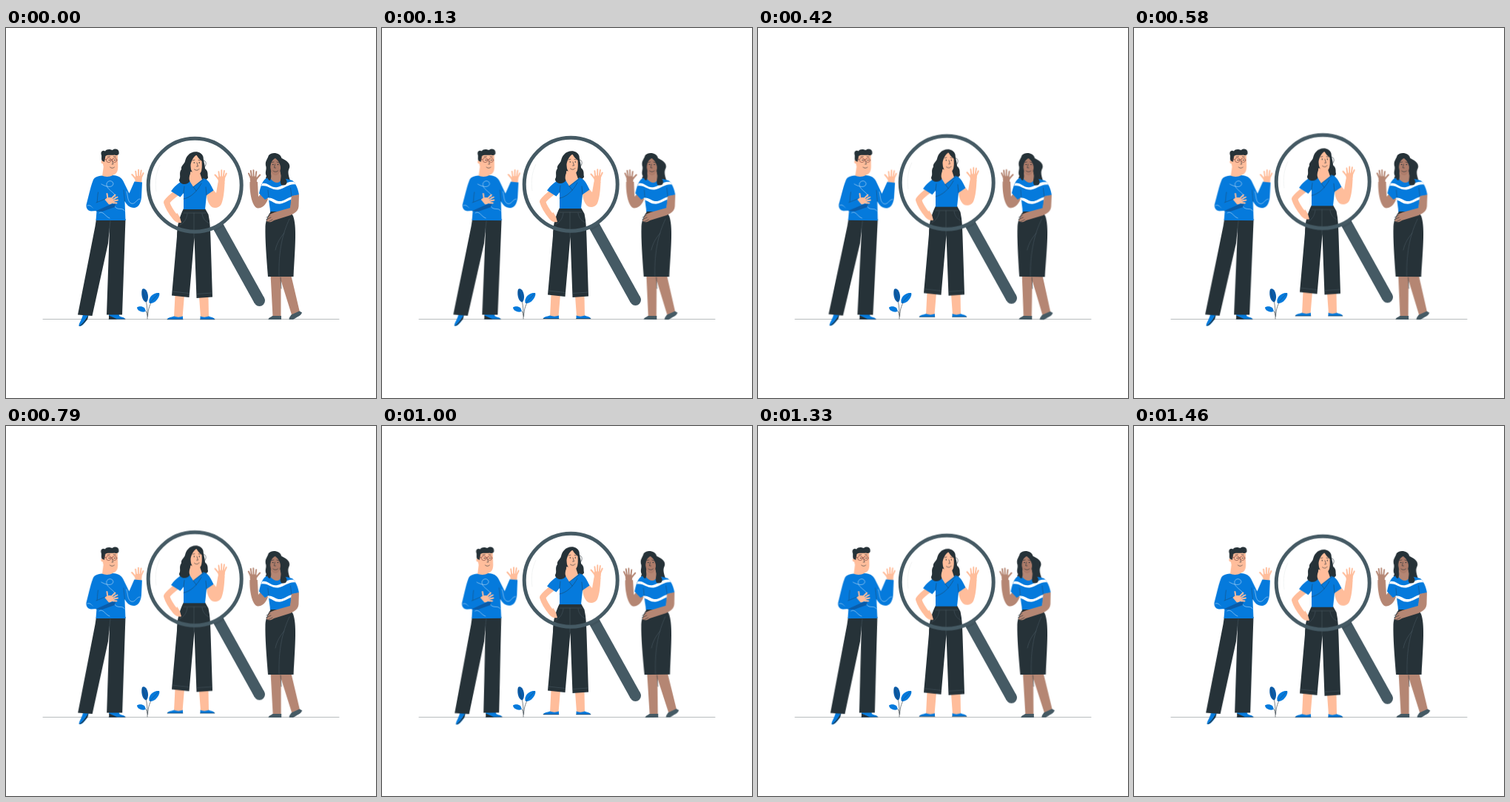
Recreate the animation shown at these times as an HTML page. Size 500 by 500 pixels, loop 1.5 s.

```html
<!DOCTYPE html>
<html lang="en">
<head>
<meta charset="utf-8">
<title>Team under the magnifier</title>
<style>
  html, body { margin: 0; width: 100%; height: 100%; overflow: hidden; background: #fff; }
  svg { display: block; width: 100%; height: 100%; }
  .blue { fill: #057adc; }
  .navy { fill: #0a5ba8; }
  .dark { fill: #263238; }
  .slate { fill: #455a64; }
  .light { fill: #ffbd9b; color: #ffbd9b; }
  .brown { fill: #b58673; color: #b58673; }
  .line { fill: none; stroke: #263238; stroke-width: .6; stroke-linecap: round; stroke-linejoin: round; }
  .pale { stroke: #fff; opacity: .75; }
  .seam { stroke: #4c5d66; stroke-width: .5; }
  .limb { fill: none; stroke: currentColor; stroke-linecap: round; stroke-linejoin: round; }
  .sway { animation: sway 1.5s linear infinite; }
  .man { transform-origin: 141.5px 283px; }
  .guest { transform-origin: 363px 282px; }
  .rise { animation: rise 1.5s linear infinite; }
  @keyframes sway {
    25% { transform: rotate(1deg); }
    75% { transform: rotate(-1deg); }
  }
  @keyframes rise {
    50% { transform: translateY(-6px); }
  }
</style>
</head>
<body>
<svg viewBox="0 0 500 500">
  <defs>
    <!-- raised hand, wrist at the origin -->
    <g id="palm">
      <path d="M-4 1C-4.500-3-4.500-6-3.800-8.500L4.500-8.500C5.500-5 4.500-2 4.300 1Z"/>
      <path class="limb" stroke-width="1.900" d="M-2.700-8L-3.600-14.800M.1-8L.3-16.800M2.700-8L3.900-16M3.800-6L6.800-12.500"/>
      <path class="limb" stroke-width="2.100" d="M-2.500-3C-4-5-6-8-8.500-10.500"/>
    </g>
  </defs>

  <path class="line" d="M50 393.500H450" stroke-opacity=".55"/>

  <g>
    <path class="line" d="M191 393C191 382 191 374 188 365M191.500 390C192 379 194 373 201 364M191 388C191 384 188 380 182 379.500"/>
    <path class="navy" d="M189 370.500C184 369 182 359 184 353C188 350 192 357 192 363C192 367 191 370 189 370.500Z"/>
    <g class="blue">
      <path d="M194 372C191 365 199 357 207 358C209 361 203 373 194 372Z"/>
      <path d="M188.500 383C184 385 177 382 177 377.500C181 375 189 376 188.500 383Z"/>
    </g>
    <path class="line" d="M184.500 355L189 369M206 359L194.500 371.500" stroke-opacity=".6"/>
  </g>

  <g class="sway man">
    <path class="blue" d="M104 387L111.500 388C111 393 107 398 104 401C102 403 98 404 98.500 402C98.500 399 103 393 104 387Z"/>
    <path class="dark" d="M98.500 402.500C103 401 106 396 111.300 388L110 394C106.500 396 104 403 98.500 402.500Z"/>
    <path class="blue" d="M139 386H152.500L153 389C156 391 161 391 161 393.500H139Z"/>
    <path class="dark" d="M139 388.500C143 390 147 392 150 393.500H139Z"/>
    <path class="line" d="M139 393.300H161"/>
    <path class="dark" d="M122 258H161.500L157 387.500H136L140 270L138 291L116.500 389L97 387.500L120.500 268Z"/>
    <path class="line seam" d="M141 261C140.500 265 140 268 139.500 276"/>

    <path class="light" d="M132 186L144 191L145 200C140 203.500 133 203 130 200.500Z"/>
    <g class="light" transform="translate(178.800 208.500)"><use href="#palm"/></g>
    <path class="blue" d="M129.500 199.500C134 201.500 140 201.500 144.500 199C152 199.500 156 202 158.500 207L166.500 223.500L173.500 207.500L184 208.500L183 229C182 238 178 243 173 243C167 243 163 239 160.500 234L161.500 260H121.500L122.500 247L115 247.500C109 247 107.500 241 109 237C112 225 115 212 118 205C120 201 125 200 129.500 199.500Z"/>
    <g class="line pale">
      <path d="M129 211C134 214 143 217 145 211C145 206 138 205 136 210C135 216 141 219 146 224C151 229 143 234 147 241C150 247 158 242 160 247"/>
      <path d="M110 240C115 238 116 244 121 244M163 221C165 228 164 234 169 237C175 239 176 231 181 231M126 250C131 246 134 255 140 257"/>
    </g>
    <path class="line" d="M122 242C124 235 123 231 124.500 222M160.500 234L159 219" stroke-opacity=".6"/>
    <path class="navy" d="M121 247.500L140 239L148 237L147 242L130 248Z"/>
    <path class="blue" d="M114 239L134 231L140 238.500L121 247Z"/>
    <path class="line" d="M122 236L134 231" stroke-opacity=".6"/>
    <g class="light">
      <path d="M133.500 232C136 229 141 228 144 230.500L146 234.500C143 237.500 141 238.500 139 238.500Z"/>
      <path class="limb" stroke-width="1.900" d="M137.500 230.500L136.500 224M142.500 230.500L147.500 225.500M144 232L150.500 228.500M144.500 234L151 232.500M143 236L149.500 236.500"/>
    </g>

    <path class="light" d="M130.500 171C137 168 147 168 151 171L151.300 187C151.500 195 148 199.500 142 198C135 196 132 190 131 184Z"/>
    <circle class="light" cx="131" cy="181" r="2.500"/>
    <path class="dark" d="M131 180C128 179 129.500 175 129 172C127 167 131 164.500 134 166.500C136 162.500 142 164 144 165C147 162 153 164 152.500 168C153.500 171 150 173 147 171.500C142 172.500 137 170.500 134.500 173L133 181Z"/>
    <g class="line">
      <g stroke="#6b3432"><circle cx="138.800" cy="178.500" r="3.200"/><circle cx="146.800" cy="178.500" r="3"/><path d="M142 178H143.800M135.600 178L132 177"/></g>
      <path d="M137 174L140.500 173.500M145.500 173.500L148.500 174M143.500 180L145 184H143M140.500 188C142.500 190 145 189.500 146.500 188"/>
    </g>
    <g class="dark"><circle cx="139.500" cy="178.500" r=".8"/><circle cx="147" cy="178.500" r=".8"/></g>
  </g>

  <g class="sway guest">
    <path class="brown" d="M357.500 333H371.500L371.500 390H360.500ZM369 333H385L397 384L386.500 389Z"/>
    <path class="line" d="M371 337L372 352" stroke="#754d40"/>
    <path class="slate" d="M360 389H372V394H354.500C354.500 391.500 358 391 360 389ZM385.500 387.500L396.500 382.500L400 384.500C399 389 392 391 388 394H382.500C382.500 391 384 390 385.500 387.500Z"/>

    <path class="dark" d="M355 172C360 166.500 371 169 372.500 176C377 178 385 182 383 189C380 195 382 200 384 206C386 212 380 216 375 215L358 208C353 209 349 206 352 200C349 195 353 191 351 186C350 180 353 178 355 172Z"/>
    <path class="brown" d="M329.500 208L340 208L341 228L347 221L354 231C351 240 345 244 340 243.500C333 242 329 224 329.500 208Z"/>
    <g class="brown" transform="translate(334.700 209) scale(-1 1)"><use href="#palm"/></g>

    <path class="blue" d="M352 203C358 201 374 202 387 206C392 210 395 219 396 225.500L386 227.500L384 249H357C357 243 355 236 355 229L350 232L342 223.500C344 214 347 205 352 203Z"/>
    <path d="M346.500 210C354 208 358 217 367 215C375 213 380 206 389 208L391.500 211.500C382 210 377 217 368 218.500C358 219.500 355 212 345 213.500ZM355 229.500C361 229 365 235 372 234C377 233 381 229 386 228L385.500 231.500C379 234 374 238.500 367 237.500C361 237 359 233 355.500 233Z" fill="#fff"/>
    <path class="line" d="M386 228L384.500 216M355 229L354 219" stroke-opacity=".6"/>
    <path class="dark" d="M358 248H384L388 254C393 268 391 292 388.500 336H354C352 310 350 286 350.500 268C351 260 354 253 358 248Z"/>
    <path class="line seam" d="M383 258C374 277 368 301 369 335M376 277C370 284 366 291 364 300"/>
    <path class="brown" d="M386 227L396 225L395.500 241C395 249 387 252.500 378 255L362 260C358 263 354 263 352 260.500L356 252L363 249L384 243Z"/>
    <path class="line" d="M352 256L357 253M351.500 259L358 256M354 262L360 259" stroke="#754d40"/>

    <path class="brown" d="M358.500 192L370 192L373 203C370 211 363 211 357 203Z"/>
    <path d="M357.500 180C359 173 369 174 371.500 181L371 190C370 196 367 200 363 199C358 197 356.500 190 357.500 180Z" fill="#ad7c6a"/>
    <path class="dark" d="M355 186C354 180 357 174 362 173C368 173 372 179 374 186C377 192 374 198 378 204C382 210 378 214 372 212C369 207 373 202 371 196C372.500 187 369.500 180 364 176C359.500 178 358 182 357 188C357 196 360 200 357 206C352 206 351 194 355 186Z"/>
    <path class="line" d="M359 181.500L362 181M366 181L369 182M363.500 184L362.500 189H364.500M361 193C363 195 366 194.500 367.500 193"/>
    <g class="dark"><circle cx="360.800" cy="184.500" r=".8"/><circle cx="367.500" cy="184.500" r=".8"/></g>
  </g>

  <g class="rise">
    <path class="light" d="M228.500 361H241L238.500 391H227ZM261 363H273.500L274 391H263Z"/>
    <path class="blue" d="M227 389.500C231 391 235 391 239 389.500V394H218C218 391 223 391 227 389.500ZM262.500 389.500C266 391 270 391 274 389.500C277 391 282 391 282 394H262.500Z"/>
    <path class="line" d="M218 393.700H239M262.500 393.700H282"/>
    <path class="dark" d="M240 244H269L273.500 252C276 263 276 274 276.500 285L279 363.500L257.500 365L254.500 283L247.500 364L224 361.500L231 282C231 266 235 254 240 244Z"/>
    <g class="line seam">
      <path d="M225 356L247.500 358.500M257.500 359.500L278.500 358M254 250V283M240 250H270M245 251C244 259 240 264 235 266M265 251C266 258 270 262 275 264"/>
    </g>

    <path class="dark" d="M246 172C252 165 264 166 266.500 174C267 181 269 185 269 190C274 194 272 198 273 202C271 207 265 206 261 203L249 209C244 214 234 211 234 205C237 201 233 196 237 191C236 186 241 184 242 180C243 176 244 174 246 172Z"/>
    <path class="line" d="M265 181C269 176 272 183 269 187"/>
    <g class="light">
      <path class="limb" stroke-width="8" d="M231 222.500C225 227 220 231 217 235.500C219 242 224 250 229 256"/>
      <path d="M224.500 256L231.500 250L235 256L237 263C232 264.500 227 261 224.500 256Z"/>
      <path d="M271 223L279.500 218L284 223L286.500 208.500L295.500 209C295 220 294 231 291 238C288 244 280 244 277 241C273 237 271 230 271 223Z"/>
      <use href="#palm" x="291" y="209"/>
      <path d="M249 194L262 196L265 205L253 216L247 206Z"/>
    </g>
    <path class="blue" d="M238 207L247 205L253 214.500L267 203C273 204 277 212 280.500 219.500L271 226L269 245H240L240 223L235.500 228.500L223 220.500C227 215 233 209 238 207Z"/>
    <path class="line" d="M253 214.500L268 204M253 214.500L257 220M264 210C258 221 250 229 240 231M240 223L241 214M271 226L270 215" stroke-opacity=".65"/>
    <path class="dark" d="M242 191C248 194 246 201 248.500 207C245 213 235 212 234.500 206C238 202 235 196 242 191Z"/>

    <path class="light" d="M249 178C250 170 262 170 264.500 178L265 188C264.500 195 261.500 199 257.500 198.500C251 197 248 190 249 178Z"/>
    <path class="dark" d="M246.500 190C245 180 247 169 256 168.500C263 168.500 266 175 266 181C262 178 259 175 257.500 171.500C253.500 174 250.500 179 249.500 185C249.500 193 249.500 198 247 201Z"/>
    <path class="dark" d="M265 180C267 186 268.500 188 268 192C269 197 273 199 272.500 203C268 205 263 202 264.500 195Z"/>
    <path class="line" d="M252 179L255 178.300M260 178.500L262.500 179M258 182L259.500 187H257.500M254.500 191C257 193 259.500 192.500 261 190.500"/>
    <g class="dark"><circle cx="254.300" cy="182" r=".8"/><circle cx="261.300" cy="182" r=".8"/></g>

    <path d="M203 221C201 208 203 195 208 185" fill="none" stroke="#eceff0" stroke-width=".7"/>
    <path d="M285.500 266L342.500 368.500" fill="none" stroke="#455a64" stroke-width="15"/>
    <circle class="slate" cx="342.500" cy="368.500" r="7.500"/>
    <path d="M279 269.500L292.500 262.500L295 267.500L282 275Z" fill="#263238" opacity=".15"/>
    <circle cx="255.200" cy="212.300" r="63" fill="none" stroke="#455a64" stroke-width="5"/>
  </g>
</svg>
</body>
</html>
```
